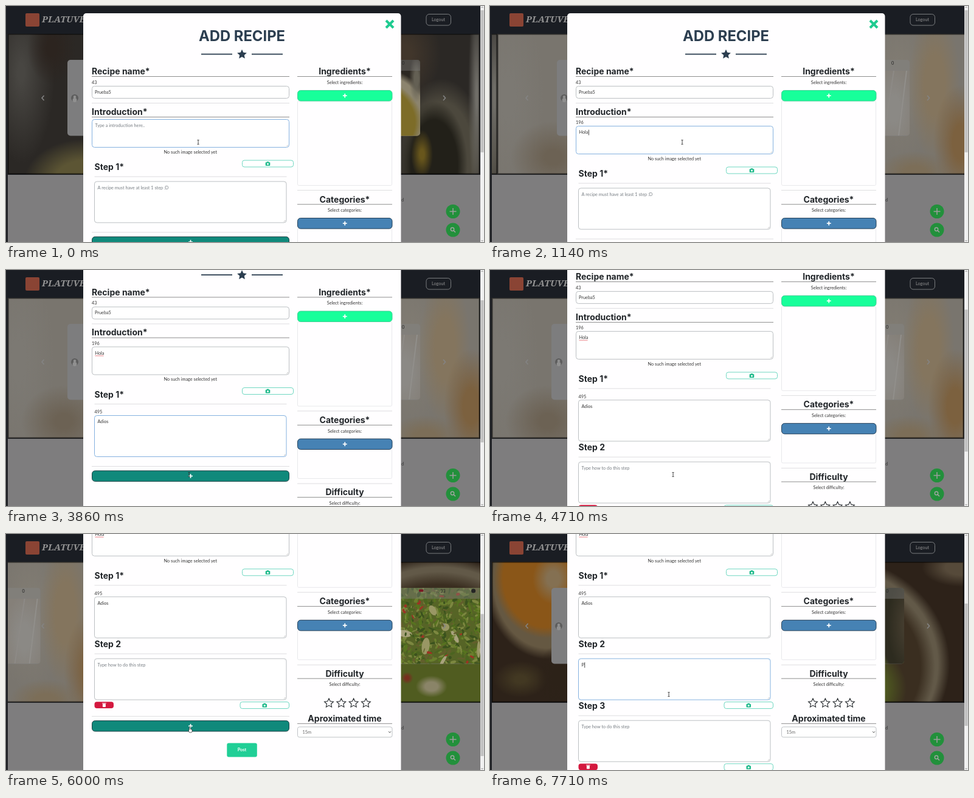
An HTML page with a canvas that plays this animation: 786x390 px, repeating every 8000 ms.

```html
<!DOCTYPE html>
<html lang="en">
<head>
<meta charset="utf-8">
<title>Add recipe</title>
<style>
html, body { margin: 0; width: 100%; height: 100%; overflow: hidden; background: #1e2024; }
canvas { display: block; }
</style>
</head>
<body>
<canvas id="stage" width="786" height="390"></canvas>
<script>
const ctx = document.getElementById('stage').getContext('2d');
const LOOP = 8000, TICK = 1000 / 7;
const BODY = '7.3px Lato, sans-serif';
const HEAD = '700 14px Inter, sans-serif';
const INK = '#212529', NAVY = '#2c3e50', MINT = '#20cf96', FOCUS = '#76a9dc';

const smooth = p => { p = Math.min(1, Math.max(0, p)); return p * p * (3 - 2 * p); };

// keys: [time, value, ...]; eased between neighbours
function track(keys, t, i = 1) {
  let a = keys[0];
  for (const b of keys) {
    if (t < b[0]) return a[i] + (b[i] - a[i]) * smooth((t - a[0]) / (b[0] - a[0]));
    a = b;
  }
  return a[i];
}

const SCROLL = [[0, 0], [3280, 0], [3800, 71.5], [4430, 71.5], [5400, 195], [5560, 195], [5850, 208.2]];
const POINTER = [[0, 316, 225], [1290, 316, 225], [1800, 298, 327], [3000, 298, 327], [3420, 301, 338],
  [4800, 301, 338], [5400, 308, 341], [5570, 308, 341], [5900, 303, 323], [6570, 303, 323], [7000, 294, 265]];
const SLIDE_STARTS = [581, 5570];

function text(s, x, y, { font = BODY, color = '#333', align = 'left' } = {}) {
  ctx.font = font;
  ctx.fillStyle = color;
  ctx.textAlign = align;
  ctx.textBaseline = 'middle';
  ctx.fillText(s, x, y);
}
function rect(x, y, w, h, color) { ctx.fillStyle = color; ctx.fillRect(x, y, w, h); }
function box(x, y, w, h, fill, stroke, r = 4, width = 0.9) {
  ctx.beginPath();
  ctx.roundRect(x, y, w, h, r);
  if (fill) { ctx.fillStyle = fill; ctx.fill(); }
  if (stroke) { ctx.strokeStyle = stroke; ctx.lineWidth = width; ctx.stroke(); }
}
function path(points, color, width = 1) {
  ctx.beginPath();
  points.forEach(([x, y]) => ctx.lineTo(x, y));
  ctx.strokeStyle = color;
  ctx.lineWidth = width;
  ctx.stroke();
}
function disc(x, y, r, color) {
  ctx.beginPath();
  ctx.arc(x, y, r, 0, 7);
  ctx.fillStyle = color;
  ctx.fill();
}
function plus(x, y, r, color, width) {
  rect(x - r, y - width / 2, 2 * r, width, color);
  rect(x - width / 2, y - r, width, 2 * r, color);
}
function star(x, y, r, fill, stroke) {
  ctx.beginPath();
  for (let i = 0; i < 10; i++) {
    const a = i * Math.PI / 5, d = i % 2 ? r * 0.48 : r;
    ctx.lineTo(x + d * Math.sin(a), y - d * Math.cos(a));
  }
  ctx.closePath();
  if (fill) { ctx.fillStyle = fill; ctx.fill(); }
  if (stroke) { ctx.strokeStyle = stroke; ctx.lineWidth = 1.1; ctx.stroke(); }
}

// soft spot of colour; rgb is 'r,g,b'
function blob(x, y, rx, ry, rgb, core = 0.5) {
  ctx.save();
  ctx.translate(x, y);
  ctx.scale(rx, ry);
  const g = ctx.createRadialGradient(0, 0, 0, 0, 0, 1);
  g.addColorStop(0, `rgb(${rgb})`);
  g.addColorStop(core, `rgb(${rgb})`);
  g.addColorStop(1, `rgba(${rgb},0)`);
  disc(0, 0, 1, g);
  ctx.restore();
}

const slides = [
  {
    back: '#2b2825',
    backdrop() {
      blob(25, 110, 55, 150, '72,70,66', 0.1);
      blob(75, 70, 40, 60, '44,36,31', 0.2);
      blob(130, 290, 100, 70, '92,85,52', 0.5);
      blob(655, 80, 60, 80, '65,54,43', 0.2);
      blob(716, 250, 75, 130, '76,72,61', 0.7);
      blob(704, 262, 55, 105, '34,32,25', 0.7);
      blob(684, 245, 18, 40, '104,86,28', 0.2);
      blob(774, 150, 14, 180, '112,110,104', 0.1);
    },
    photo() {
      rect(391, 89, 290, 125, '#2c2721');
      blob(560, 190, 150, 100, '140,132,110', 0.9);
      blob(560, 192, 125, 84, '125,108,40', 0.9);
      blob(675, 120, 12, 40, '100,96,84', 0.3);
    }
  },
  {
    back: '#79756e',
    backdrop() {
      blob(20, 150, 60, 160, '124,121,115', 0.2);
      blob(95, 250, 70, 60, '108,98,84', 0.2);
      blob(665, 130, 60, 130, '128,123,114', 0.3);
      blob(722, 130, 42, 125, '132,117,94', 0.4);
      blob(765, 225, 45, 95, '124,97,63', 0.3);
      blob(690, 275, 60, 35, '124,110,88', 0.3);
    },
    photo() {
      rect(391, 89, 290, 125, '#858079');
      blob(520, 160, 110, 70, '145,92,34', 0.8);
      blob(655, 170, 34, 70, '139,137,133', 0.3);
      path([[639, 214], [655, 107]], '#8d8a86', 2);
      path([[663, 214], [676, 107]], '#918f8b', 2);
    }
  },
  {
    back: '#2d2219',
    backdrop() {
      blob(95, 75, 104, 132, '101,88,66', 0.86);
      blob(92, 72, 86, 100, '138,86,24', 0.82);
      blob(104, 74, 34, 42, '132,112,82', 0.3);
      blob(50, 240, 45, 30, '66,56,34', 0.2);
      blob(112, 238, 35, 55, '44,34,24', 0.2);
      blob(560, 215, 196, 178, '98,89,72', 0.9);
      blob(560, 220, 172, 158, '58,46,32', 0.86);
      blob(560, 255, 125, 90, '80,92,32', 0.7);
      blob(548, 252, 26, 18, '138,132,104', 0.4);
      blob(508, 238, 10, 10, '118,46,30', 0.3);
      blob(775, 55, 65, 32, '86,74,58', 0.4);
    },
    photo() {
      rect(391, 89, 290, 125, '#566426');
      const greens = ['#4b6420', '#6a7f2e', '#3b521d', '#7c8740', '#57741f', '#625f2c'];
      let seed = 11;
      const rnd = () => (seed = seed * 16807 % 2147483647) / 2147483647;
      const bits = (count, size, colors) => {
        for (let i = 0; i < count; i++) {
          ctx.beginPath();
          ctx.ellipse(395 + rnd() * 240, 88 + rnd() * 128, size * (0.5 + rnd()), size * (0.2 + rnd() * 0.4), rnd() * 3, 0, 7);
          ctx.fillStyle = colors[Math.floor(rnd() * colors.length)];
          ctx.fill();
        }
      };
      bits(700, 5, greens);
      bits(22, 11, ['#a8a27c', '#999764']);
      bits(34, 4, ['#9c3323']);
      bits(250, 3, greens);
      blob(676, 150, 42, 95, '45,43,31', 0.8);
      blob(690, 150, 36, 82, '70,62,48', 0.2);
    }
  }
];

function drawSlide(slide, x) {
  ctx.save();
  ctx.translate(x, 0);
  ctx.beginPath();
  ctx.rect(3, 46, 776, 232);
  ctx.clip();
  rect(3, 46, 776, 232, slide.back);
  slide.backdrop();
  ctx.strokeStyle = 'rgba(0,0,0,.6)';
  ctx.lineWidth = 3;
  ctx.strokeRect(3, 46, 776, 232);

  ctx.beginPath();
  ctx.roundRect(101, 89, 580, 125.5, 5);
  ctx.clip();
  rect(101, 89, 580, 126, '#7d7d7e');
  text('Introduction', 201, 127, { font: HEAD, color: '#111418' });
  text('Cozy, comforting, and full of flavour, a homemade', 157, 143, { color: '#1b1b1b' });
  text('chicken noodle soup for every day', 174, 153.5, { color: '#1b1b1b' });
  rect(146, 144, 0.8, 16, '#444');
  disc(113, 152, 6, '#5d5d5d');
  disc(113, 150.2, 2.2, '#909090');
  disc(113, 155.5, 3.4, '#909090');
  slide.photo();
  rect(391, 89, 290, 18, 'rgba(125,125,125,.42)');
  disc(529.5, 93.5, 2.2, '#7b1822');
  disc(532.5, 93.5, 2.2, '#7b1822');
  text('33', 567, 94.5, { color: '#252525', align: 'center' });
  disc(617, 94, 3.6, '#252525');
  text('0', 653, 94.5, { color: '#252525', align: 'center' });
  ctx.restore();
}

function drawPage(t) {
  rect(0, 0, 786, 390, '#1e2024');
  rect(0, 0, 780, 46, '#1a1d23');
  rect(3, 279, 777, 111, '#7e7d7e');
  box(32, 12, 23, 22, '#8a4434', null, 2);
  text('PLATUVE', 59, 23, { font: 'italic 900 15px "Noto Serif", serif', color: '#929292' });
  box(691, 13.5, 40.5, 18.5, null, '#858789', 5);
  text('Logout', 711, 23, { color: '#929292', align: 'center' });

  ctx.save();
  ctx.beginPath();
  ctx.rect(3, 46, 777, 232.5);
  ctx.clip();
  const index = t >= SLIDE_STARTS[1] ? 1 : 0;
  const shift = 776 * smooth((t - SLIDE_STARTS[index]) / 600);
  if (shift < 776) drawSlide(slides[index], -shift);
  if (shift > 0) drawSlide(slides[index + 1], 776 - shift);
  ctx.restore();

  path([[62.5, 148], [59, 152], [62.5, 156]], '#848484', 1.6);
  path([[719, 148], [722.5, 152], [719, 156]], '#848484', 1.6);
  text('d', 650, 321, { color: '#333' });
  disc(735, 339.5, 11.5, '#22903b');
  plus(735, 339.5, 5.5, '#9a9d9a', 1.6);
  disc(735, 370, 11.5, '#22903b');
  ctx.beginPath();
  ctx.arc(734, 369, 2.7, 0, 7);
  ctx.strokeStyle = '#a3a6a3';
  ctx.lineWidth = 1.4;
  ctx.stroke();
  path([[736, 371], [739, 374]], '#a3a6a3', 1.6);
}

function camera(x, y, w) {
  box(x, y, w, 11, '#fff', '#4bcdb2', 3.5, 0.8);
  const cx = x + w / 2, cy = y + 5.8;
  box(cx - 3.8, cy - 2.6, 7.6, 5.8, '#20bb8c', null, 1);
  rect(cx - 1.7, cy - 3.6, 3.4, 1.5, '#20bb8c');
  disc(cx, cy + 0.3, 1.5, '#fff');
}
function wideButton(x, y, w, fill, border) {
  box(x, y, w, 17.5, fill, border, 5);
  plus(x + w / 2, y + 8.7, 3.4, '#fff', 1.7);
}
function area(x, y, w, h, { value = '', hint = '', focus, caret, misspelt }) {
  box(x, y, w, h, '#fff', focus ? FOCUS : '#b4b8bc');
  path([[x + w - 4, y + h - 1.5], [x + w - 1.5, y + h - 4]], '#888', 0.6);
  text(value || hint, x + 5, y + 10.5, { color: value ? '#333' : '#777d83' });
  const width = ctx.measureText(value).width;
  if (caret) rect(x + 5.5 + width, y + 6, 0.8, 9, '#222');
  if (misspelt) {
    const wave = [];
    for (let d = 0; d <= width; d++) wave.push([x + 5 + d, y + 14.3 + (d % 2) * 0.9]);
    path(wave, '#e0404a', 0.8);
  }
}
function heading(s, y, caption) {
  text(s, 557, y, { font: HEAD, color: INK, align: 'center' });
  rect(479, y + 7, 156, 1, '#8e8e8e');
  if (caption) text(caption, 557, y + 17.5, { align: 'center' });
}

// times: when each character appears
const typed = (word, times, t) => word.slice(0, times.filter(at => t >= at).length);
const typing = (times, t) => times.some(at => t >= at && t < at + 420);
const HOLA = [280, 420, 565, 990], ADIOS = [2280, 2420, 2565, 2850, 2990], NEXT = [7705];

function drawRight() {
  heading('Ingredients*', 109, 'Select ingredients:');
  box(479.5, 157, 155, 139.5, null, '#e6e6e9', 2);
  wideButton(479.5, 139.5, 155.5, '#17ff9a', '#3cc98f');
  rect(479, 304, 156, 1, '#dedee0');
  heading('Categories*', 320.3, 'Select categories:');
  box(479.5, 367, 155, 49, null, '#e6e6e9', 2);
  wideButton(479.5, 350.5, 155.5, '#4682b4', '#17324a');
  rect(479, 424, 156, 1, '#dedee0');
  heading('Difficulty', 439.6, 'Select difficulty:');
  for (let i = 0; i < 4; i++) star(531 + i * 20.3, 487.8, 7.8, null, '#23272b');
  heading('Aproximated time', 514);
  box(479.5, 527, 155.5, 17, '#fff', '#b8bcc0', 3);
  text('15m', 487.5, 535.5, { color: '#666' });
  path([[629, 534.5], [631, 536.5], [633, 534.5]], '#444', 1);
}

function stepHeading(n, y) {
  const style = { font: HEAD, color: INK }, title = 'Step ' + n;
  text(title, 145.5, y, style);
  // drawn apart, since the font turns "1*" into a multiplication sign
  if (n === 1) text('*', 145.5 + ctx.measureText(title).width, y, style);
  rect(145.5, y + 14.7, 316, 1, '#dedee0');
}

// returns the height of the scrolled content
function drawLeft(t) {
  text('Recipe name*', 141, 109, { font: HEAD, color: INK });
  rect(141, 116, 325, 1, '#8e8e8e');
  text('43', 141, 126.5);
  box(141.5, 132.5, 324, 20, '#fff', '#b4b8bc');
  text('Prueba5', 146, 142.5);
  rect(141, 160, 325, 1, '#dedee0');
  text('Introduction*', 141, 175.5, { font: HEAD, color: INK });
  rect(141, 183, 325, 1, '#8e8e8e');

  const intro = typed('Hola', HOLA, t);
  const counted = typed('Hola', HOLA, t - 143).length;
  const drop = counted ? 11 : 0;
  if (counted) text(String(200 - counted), 141, 193);
  area(141.5, 187.5 + drop, 324, 46, {
    value: intro, hint: 'Type a introduction here..', focus: t < 1700, caret: typing(HOLA, t), misspelt: t >= 1700
  });
  text('No such image selected yet', 303.3, 241.5 + drop, { align: 'center' });
  camera(388.5, 255 + drop, 84);

  const steps = t >= 6420 ? 3 : t >= 4280 ? 2 : 1;
  const first = typed('Adios', ADIOS, t);
  let y = 266.8 + drop, bottom;
  for (let n = 1; n <= steps; n++) {
    stepHeading(n, y);
    let top = y + 23.2;
    if (n === 1 && first) {
      top += 11;
      text(String(500 - first.length), 145.5, top - 5.3);
    }
    area(145.5, top, 315.5, 68, [
      { value: first, hint: 'A recipe must have at least 1 step :D', focus: t >= 1700 && t < 4280, caret: typing(ADIOS, t) },
      { value: typed('P', NEXT, t), hint: 'Type how to do this step', focus: t >= 6990, caret: typing(NEXT, t) },
      { hint: 'Type how to do this step' }
    ][n - 1]);
    bottom = top + 68;
    if (n > 1) {
      camera(385, bottom + 3.5, 80.5);
      if (n === steps) {
        box(145.5, bottom + 3.2, 31.5, 10.8, '#d4193f', null, 4);
        box(158.9, bottom + 6.6, 5, 5.4, '#fff', null, 0.8);
        rect(158, bottom + 5.3, 6.8, 0.9, '#fff');
      }
    }
    y = bottom + 11;
  }
  if (steps > 1) bottom += 11.3;
  rect(141, bottom + 15.5, 325, 1, '#dedee0');
  const add = bottom + 23.3;
  wideButton(141.5, add, 324, '#10897b', '#17353a');

  const post = Math.max(553.5, add + 37);
  box(363.3, post, 49.5, 23, MINT, null, 3);
  text('Post', 388, post + 11.5, { font: '700 7.3px Lato, sans-serif', color: '#fff', align: 'center' });
  return post + 81;
}

function drawModal(t, scroll) {
  ctx.save();
  ctx.translate(0, -scroll);
  box(127, 12, 522.5, 900, '#fffeff', null, 5);
  path([[625, 24], [637, 36]], '#1fcb90', 4);
  path([[637, 24], [625, 36]], '#1fcb90', 4);
  text('ADD RECIPE', 388, 50.5, { font: '700 23.8px Inter, sans-serif', color: NAVY, align: 'center' });
  rect(321, 78.7, 51, 1.8, NAVY);
  rect(404, 78.7, 51, 1.8, NAVY);
  star(388, 80, 8.3, NAVY);
  drawRight();
  const height = drawLeft(t);
  ctx.restore();
  return height;
}

function drawScrollbar(scroll, height) {
  const ratio = 382 / height;
  rect(780, 0, 6, 390, '#f1f1f1');
  rect(780.5, 7 + scroll * ratio, 5, 390 * ratio, '#c1c1c1');
  path([[781.5, 3], [783, 1.5], [784.5, 3]], '#666', 0.8);
  path([[781.5, 387], [783, 388.5], [784.5, 387]], '#666', 0.8);
}

function drawPointer(t) {
  const x = track(POINTER, t), y = track(POINTER, t, 2);
  if (t >= 5700 && t < 6600) {
    box(x - 1.4, y - 4.5, 1.8, 6, '#fff', '#222', 0.9, 0.7);
    box(x - 2.4, y - 0.5, 5.4, 5.5, '#fff', '#222', 1.6, 0.7);
    rect(x - 1, y - 2, 1, 4, '#fff');
    return;
  }
  rect(x - 0.4, y - 3.5, 0.9, 7, '#333');
  rect(x - 1.6, y - 3.9, 3.2, 0.8, '#333');
  rect(x - 1.6, y + 3.1, 3.2, 0.8, '#333');
}

function frame(now) {
  const t = Math.floor((now % LOOP + 5) / TICK) * TICK;
  const scroll = track(SCROLL, t);
  drawPage(t);
  const height = drawModal(t, scroll);
  drawScrollbar(scroll, height);
  drawPointer(t);
}

const start = performance.now();
function loop() {
  frame(performance.now() - start);
  requestAnimationFrame(loop);
}
loop();
</script>
</body>
</html>
```
